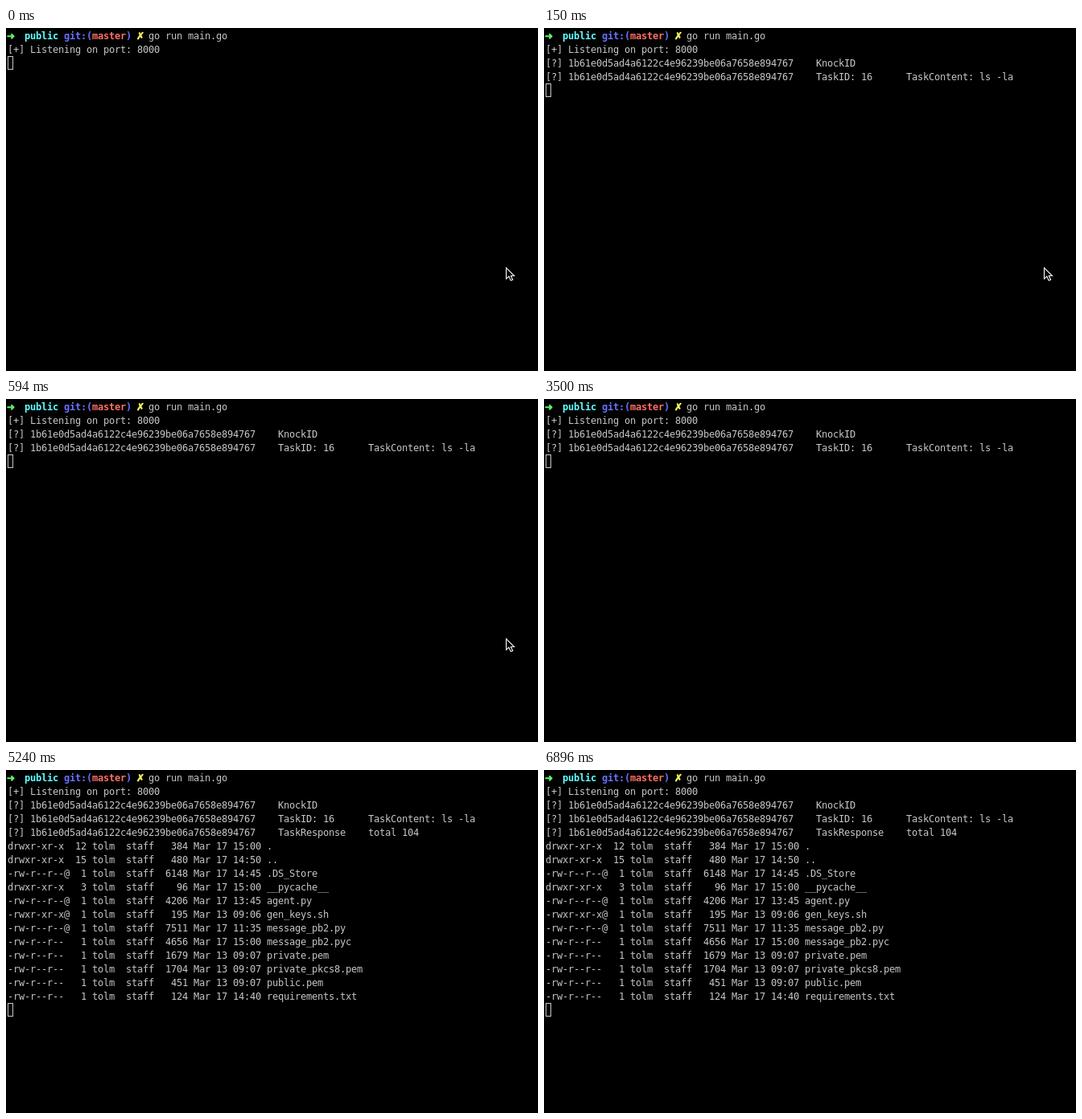
An HTML page that plays this animation: 661x427 px, repeating every 8 s.

```html
<!DOCTYPE html>
<html lang="en">
<head>
<meta charset="utf-8">
<title>Terminal session</title>
<style>
  html, body { margin: 0; width: 100%; height: 100%; overflow: hidden; background: #000; }
  #stage { position: relative; width: 661px; height: 427px; overflow: hidden; background: #000; }
  .row {
    position: absolute; left: 2px; height: 17px; white-space: pre; color: #c7c7c7;
    font: 12px/17px "DejaVu Sans Mono", monospace; letter-spacing: calc(7px - 1ch);
    font-variant-ligatures: none;
  }
  b { letter-spacing: calc(7px - 1ch); }
  .icon {
    display: inline-block; width: 7px; height: 17px; text-indent: -1px; letter-spacing: 0;
    font-family: "DejaVu Sans", sans-serif; -webkit-text-stroke: 0.7px;
  }
  .green { color: #5ffa68; }
  .cyan { color: #60fdff; }
  .blue { color: #6871ff; }
  .red { color: #ff6e67; }
  .yellow { color: #fffc67; }
  #cursor { position: absolute; left: 2px; width: 7px; height: 17px; box-sizing: border-box; border: 1px solid #c7c7c7; }
  #pointer { position: absolute; left: 620px; top: 297px; }
</style>
</head>
<body>
<div id="stage">
  <div id="cursor"></div>
  <svg id="pointer" width="14" height="20">
    <path d="M1.5 1.5V15.2L4.8 12.2L7.2 17.4L9.6 16.4L7.3 11.5H11.5Z" fill="#000" stroke="#fff" stroke-width="1.1"/>
  </svg>
</div>
<script>
const LOOP = 8000, ROW = 17, TEXT_TOP = 2, CURSOR_TOP = 1;
const stage = document.getElementById("stage");
const cursor = document.getElementById("cursor");
const pointer = document.getElementById("pointer");

const prompt = '<b class="icon green">➜</b>  <b class="cyan">public</b> <b class="blue">git:(</b>' +
  '<b class="red">master</b><b class="blue">)</b> <b class="icon yellow">✗</b> go run main.go';

const agent = "1b61e0d5ad4a6122c4e96239be06a7658e894767";
const log = (kind, detail = "") => `[?] ${agent}`.padEnd(48) + kind.padEnd(16) + detail;

const files = `drwxr-xr-x|12|384|17 15:00|.
drwxr-xr-x|15|480|17 14:50|..
-rw-r--r--@|1|6148|17 14:45|.DS_Store
drwxr-xr-x|3|96|17 15:00|__pycache__
-rw-r--r--@|1|4206|17 13:45|agent.py
-rwxr-xr-x@|1|195|13 09:06|gen_keys.sh
-rw-r--r--@|1|7511|17 11:35|message_pb2.py
-rw-r--r--|1|4656|17 15:00|message_pb2.pyc
-rw-r--r--|1|1679|13 09:07|private.pem
-rw-r--r--|1|1704|13 09:07|private_pkcs8.pem
-rw-r--r--|1|451|13 09:07|public.pem
-rw-r--r--|1|124|17 14:40|requirements.txt`.split("\n").map(line => {
  const [mode, links, size, date, name] = line.split("|");
  return `${mode.padEnd(11)}${links.padStart(3)} tolm  staff${size.padStart(6)} Mar ${date} ${name}`;
});

const lines = [
  prompt,
  "[+] Listening on port: 8000",
  log("KnockID"),
  log("TaskID: 16", "TaskContent: ls -la"),
  log("TaskResponse", "total 104"),
  ...files
];

const rows = lines.map((html, i) => {
  const row = document.createElement("div");
  row.className = "row";
  row.style.top = TEXT_TOP + i * ROW + "px";
  row.innerHTML = html;
  stage.insertBefore(row, cursor);
  return row;
});

// Start time, printed lines, mouse pointer shown
const steps = [
  [0, 2, true],
  [150, 4, true],
  [890, 4, false],
  [5240, lines.length, false]
];

function draw(now) {
  const time = now % LOOP;
  const [, count, mouse] = steps.filter(step => step[0] <= time).pop();
  rows.forEach((row, i) => { row.style.visibility = i < count ? "visible" : "hidden"; });
  cursor.style.top = CURSOR_TOP + count * ROW + "px";
  pointer.style.visibility = mouse ? "visible" : "hidden";
}

const start = performance.now();
function tick() {
  draw(performance.now() - start);
  requestAnimationFrame(tick);
}
tick();
</script>
</body>
</html>
```
